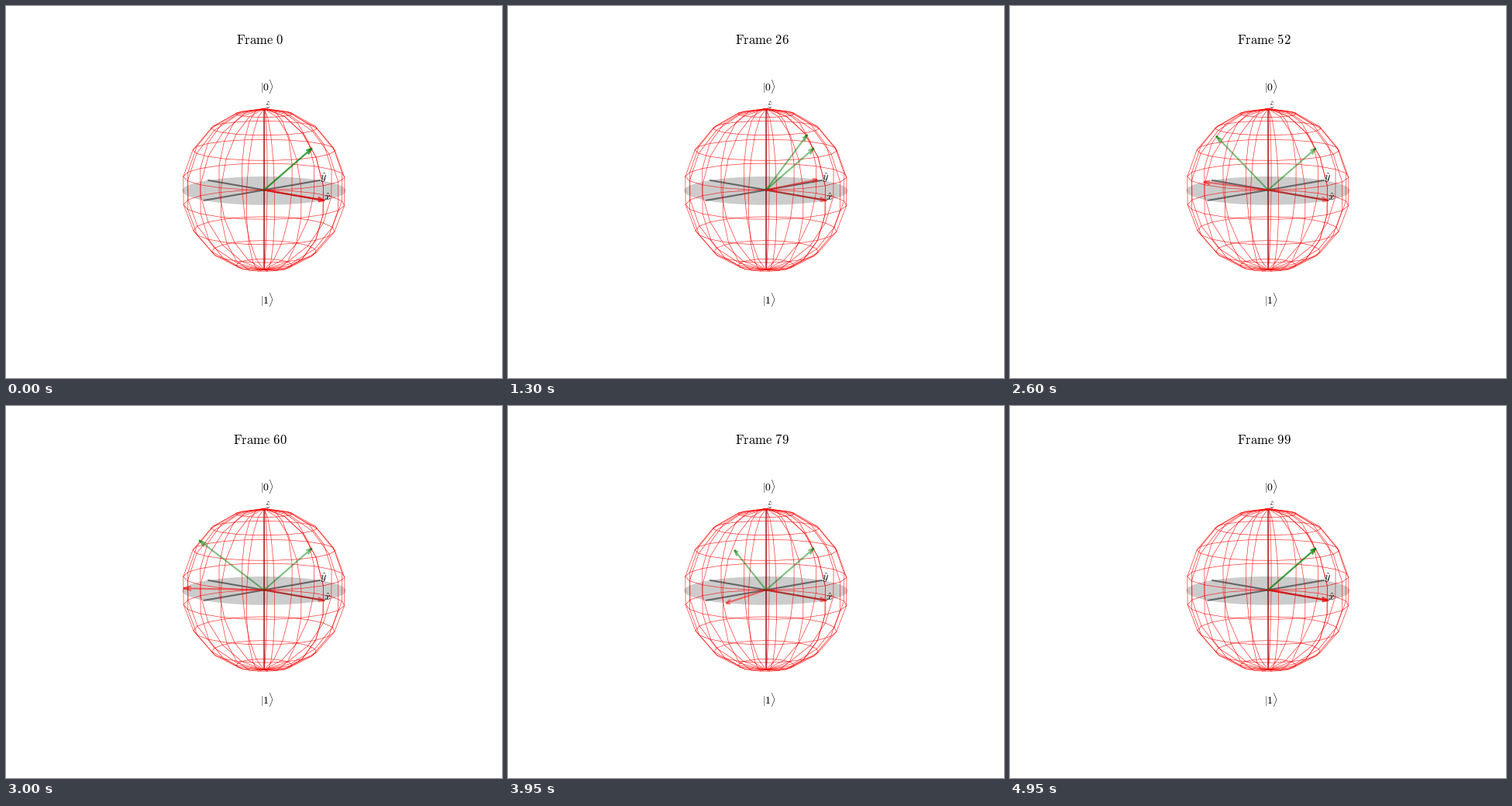
Write a matplotlib script that moves like this. It is 640 by 480 pixels and loops after 5000 ms.

```python
import numpy as np
import matplotlib.pyplot as plt
from matplotlib.animation import FuncAnimation
from matplotlib.collections import LineCollection

plt.rcParams["mathtext.fontset"] = "cm"

WIDTH, HEIGHT, DPI = 640, 480, 100
FRAMES, INTERVAL = 100, 50
ELEV, AZIM = np.radians(10), np.radians(-45)
CENTER = np.array([333.0, 242.6])   # sphere centre, pixels from bottom left
SCALE, DISTANCE = 105.5, 18.93      # pixels per unit, camera distance in units
THETA = np.arccos(0.6)              # polar angle of the green state
HEAD, SPREAD = 0.1, np.radians(15)

RIGHT = np.array([-np.sin(AZIM), np.cos(AZIM), 0])
TOWARD = np.array([np.cos(ELEV) * np.cos(AZIM),
                   np.cos(ELEV) * np.sin(AZIM), np.sin(ELEV)])
UP = np.cross(TOWARD, RIGHT)


def project(points):
    """Perspective projection of 3D points to stage pixels."""
    points = np.asarray(points, dtype=float)
    size = SCALE / (1 - points @ TOWARD / DISTANCE)
    flat = np.stack([points @ RIGHT, points @ UP], axis=-1)
    return CENTER + flat * size[..., None]


def sphere(theta, phi):
    theta, phi = np.broadcast_arrays(theta, phi)
    return np.stack([np.sin(theta) * np.cos(phi),
                     np.sin(theta) * np.sin(phi),
                     np.cos(theta)], axis=-1)


def arrow(theta, phi):
    """Shaft and two barbs; the barbs lie in the arrow's vertical plane."""
    tip = sphere(theta, phi)
    barbs = [tip - HEAD * sphere(theta + turn, phi) for turn in (SPREAD, -SPREAD)]
    return [project([np.zeros(3), tip])] + [project([tip, b]) for b in barbs]


def arrows(phi):
    return [segment
            for theta in (np.pi / 2, THETA)
            for angle in (0, phi)
            for segment in arrow(theta, angle)]


fig = plt.figure(figsize=(WIDTH / DPI, HEIGHT / DPI), dpi=DPI, facecolor="white")
ax = fig.add_axes([0, 0, 1, 1])
ax.set_xlim(0, WIDTH)
ax.set_ylim(0, HEIGHT)
ax.axis("off")

# Axes through the sphere and the equatorial disc
for axis in np.eye(3):
    ax.plot(*project([-axis, axis]).T, color="black", alpha=0.5, lw=1.5, zorder=1)
ax.plot(*project([[0, 0, -1], [0, 0, 1]]).T, color="red", alpha=0.5, lw=1, zorder=2)
equator = project(sphere(np.pi / 2, np.linspace(0, 2 * np.pi, 200)))
ax.fill(*equator.T, color="black", alpha=0.2, lw=0, zorder=2)

# Wireframe
u, v = np.mgrid[0:2 * np.pi:20j, 0:np.pi:10j]
grid = project(sphere(v, u))
lines = list(grid) + list(grid.swapaxes(0, 1))
ax.add_collection(LineCollection(lines, colors="red", linewidths=0.5,
                                 alpha=0.8, zorder=3))

vectors = LineCollection(arrows(0), colors=["red"] * 6 + ["green"] * 6,
                         linewidths=1.5, alpha=0.5, zorder=4)
ax.add_collection(vectors)

# Labels
for name, axis in zip("xyz", np.eye(3)):
    ax.text(*project(axis), rf"$\hat{{{name}}}$", fontsize=10, zorder=5)
for state, y in ((0, 370.5), (1, 95.5)):
    ax.text(328, y, rf"$|{state}\rangle$", fontsize=10, zorder=5)
title = ax.text(328, 430.7, "", fontsize=12, ha="center", zorder=5)


def update(frame):
    vectors.set_segments(arrows(2 * np.pi * frame / (FRAMES - 1)))
    title.set_text(rf"$\mathrm{{Frame\ {frame}}}$")
    return vectors, title


anim = FuncAnimation(fig, update, frames=FRAMES, interval=INTERVAL,
                     repeat=True, repeat_delay=0)
plt.show()
```
